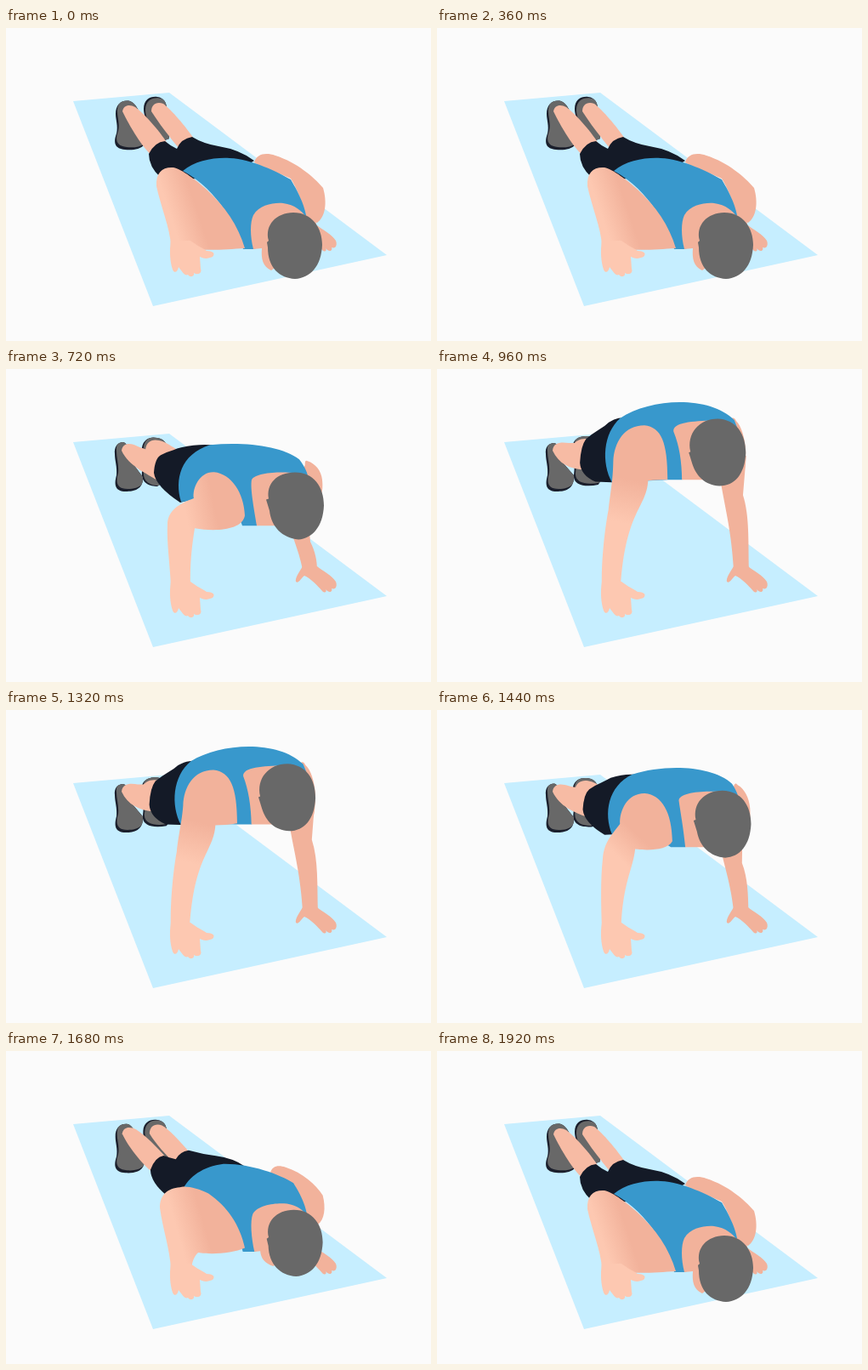
Write an HTML page with a canvas that moves like this. It is 500x368 px and loops after 2040 ms.

```html
<!DOCTYPE html>
<html lang="en">
<head>
<meta charset="utf-8">
<title>Push-up</title>
<style>
  html, body { margin: 0; width: 100%; height: 100%; overflow: hidden; background: #fbfbfb; }
  canvas { display: block; }
</style>
</head>
<body>
<canvas id="stage" width="500" height="368"></canvas>
<script>
const ctx = document.getElementById('stage').getContext('2d');
const LOOP = 2040, STEP = 120;
const MID = 0.6; // lift of the middle pose
const color = {
  back: '#fbfbfb', mat: '#c6eeff', shirt: '#3898cc', shorts: '#141a27',
  light: '#fdc8b1', skin: '#f2b29b', leg: '#f7bba4', grey: '#686868', sole: '#1b1f2c'
};

// Each moving part: its outline lowered, halfway and raised.
const parts = {
  farShoe: [
    'M162,95 C162,84 170,80 178,81 C186,82 189,88 189,95 L192,130 L187,132 C180,128 172,120 168,113 C165,108 162,102 162,95Z',
    'M160,92 C162,82 170,79 178,81 C185,82 188,86 189,90 L190,130 L178,138 C170,138 158,135 160,120 C162,110 159,100 160,92Z',
    'M160,88 C163,80 170,79 178,79 C184,80 188,84 189,90 L195,128 L190,136 C175,139 160,137 161,125 C163,110 161,100 160,88Z'],
  nearShoe: [
    'M129,101 C129,90 136,84 146,86 C153,89 156,96 158,104 L163,137 C158,143 148,144 140,143 C128,142 126,135 130,124 C132,115 129,108 129,101Z',
    'M128,100 C127,92 131,86 138,86 C143,87 144,95 146,107 L161,127 C162,142 150,144 141,144 C128,144 127,136 130,125 C131,115 128,108 128,100Z',
    'M128,100 C127,92 131,87 138,87 C143,88 145,97 147,109 L161,125 C162,142 150,144 141,144 C128,144 127,136 130,125 C131,115 128,108 128,100Z'],
  farLeg: [
    'M171,98 C171,90 177,86 185,89 C192,94 207,110 221,130 L204,142 C192,128 180,112 171,98Z',
    'M164,95 C165,86 171,82 180,84 C188,85 195,92 206,97 L190,115 C180,110 168,104 164,95Z',
    'M160,90 C162,85 168,82 174,82 C178,82 180,82 184,84 L178,100 C172,98 165,96 160,90Z'],
  nearLeg: [
    'M137,98 C138,91 145,89 152,93 C162,100 180,120 190,136 L172,150 C162,143 145,115 137,98Z',
    'M136,96 C137,87 146,86 155,91 C163,94 172,97 184,101 L180,132 C165,122 145,115 136,96Z',
    'M136,96 C137,86 146,86 155,87 C162,87 168,86 178,83 L174,118 C156,118 143,111 136,96Z'],
  shorts: [
    'M168,148 Q175,134 187,133 Q194,139 201,142 Q206,130 219,128 Q232,136 250,139 Q275,143 292,156 L260,175 L208,178 L182,176 Q168,163 168,148Z',
    'M174,122 Q175,105 182,101 Q190,97 197,95 Q201,93 206,92 Q225,88 240,89 Q250,89 255,90 L235,130 L212,155 L205,157 Q176,138 174,122Z',
    'M168,110 Q169,90 175,82 Q182,76 190,71 Q197,67 202,62 Q208,58 213,57 Q218,56 225,58 L215,100 L212,133 L186,132 Q169,125 168,110Z'],
  farShoulder: [
    'M292,158 C295,148 305,146 317,150 C342,158 362,175 373,188 C378,205 376,222 366,229 L352,222 C350,205 340,185 335,177 C320,170 300,163 292,158Z',
    'M352,112 C352,107 353,107 355,108 C364,111 371,119 372,130 C373,140 372,148 368,150 L352,150 C350,135 350,122 350,116 C351,115 352,113 352,112Z',
    'M345,58 C348,55 350,56 352,60 C358,66 362,80 363,95 C363,110 362,120 360,125 L335,125 C335,100 340,80 345,70 C345,65 345,60 345,58Z'],
  farArm: [
    'M338,210 C340,220 346,228 349,236 L366,236 C365,225 360,215 358,210 L350,205Z',
    'M330,170 C335,195 344,210 349,236 L366,236 C366,226 364,215 358,203 L356,180Z',
    'M331,110 C335,150 346,180 349,236 L367,236 C366,205 368,172 360,147 L364,100Z'],
  shirt: [
    'M208,168 C222,156 245,152 263,153 C290,154 320,170 335,178 C343,192 350,205 353,220 L320,240 L292,260 L279,260 C275,240 250,190 208,168Z',
    'M206,156 C198,130 205,100 240,89 C280,85 325,90 345,106 C352,115 355,122 356,130 L330,160 L295,184 L278,184 C275,170 250,150 206,156Z',
    'M206,133 C193,110 195,75 215,57 C250,33 320,29 350,59 C352,65 355,70 354,75 L330,110 L288,129 L271,129 C250,130 220,133 206,133Z'],
  neck: [
    'M291,260 C287,245 287,228 291,220 C298,208 315,205 326,206 C340,208 348,215 353,222 L345,260 L312,285 C302,280 300,272 301,259Z',
    'M295,184 C292,165 287,140 289,130 C293,121 325,120 340,122 C350,124 354,128 356,132 L345,165 L320,184 C310,184 300,184 295,184Z',
    'M288,129 C288,108 285,88 278,72 C277,61 300,60 325,59 C335,58 345,60 352,66 L345,110 L320,129 C310,129 300,129 288,129Z'],
  nearArm: [
    'M194,256 C193,235 182,210 177,186 C176,170 184,163 197,164 C207,166 225,180 235,189 C258,210 273,232 281,259 C262,260 240,262 228,260 C222,258 219,258 218,264Z',
    'M194,256 C193,230 189,205 190,183 C190,166 205,158 221,152 C219,140 228,120 245,121 C265,123 280,145 281,172 C278,190 245,191 222,187 C219,205 216,230 217,256Z',
    'M194,256 C193,230 197,190 202,165 C205,140 207,130 207,108 C208,85 220,65 244,65 C264,67 271,85 271,129 C262,129 255,129 249,130 C247,163 222,165 216,256Z'],
  head: [
    'M308,258 L307,252 L309,250 C304,232 318,217 338,217 C360,217 372,235 372,255 C371,280 358,294 340,295 C322,294 308,282 308,258Z',
    'M310,166 L306,153 L309,152 C306,135 318,121 340,121 C362,121 374,138 374,160 C373,185 360,199 344,200 C325,198 312,185 310,166Z',
    'M300,110 L296,97 L298,96 C293,75 308,57 330,57 C352,58 363,75 363,97 C362,122 350,136 332,136 C315,135 305,125 300,110Z'],
  // from light to dark skin along the near arm
  shade: ['195,225 225,215', '212,172 246,165', '222,182 232,130']
};

const mat = 'M79,86 L192,76 L448,267 L173,327Z';
const farHand = 'M349,232 C344,240 340,246 341,250 C344,253 347,246 351,243 C358,246 366,254 372,261 C375,264 378,262 376,259 C380,264 385,262 383,258 C388,260 390,255 388,250 C384,243 372,237 366,232Z';
const nearHand = 'M194,250 C192,262 193,275 196,284 C198,289 202,287 203,281 C207,286 210,292 214,290 C217,294 222,292 221,288 C226,291 231,288 229,283 L228,269 C234,272 238,271 243,269 C247,265 243,262 236,262 C230,258 225,256 217,250Z';

const NUM = /\d+/g;

function pose(name, lift) {
  const i = lift < MID ? 0 : 1;
  const u = i ? (lift - MID) / (1 - MID) : lift / MID;
  const end = parts[name][i + 1].match(NUM);
  let n = 0;
  return parts[name][i].replace(NUM, a => (+a + (end[n++] - a) * u).toFixed(2));
}

function fill(path, paint) {
  ctx.fillStyle = paint;
  ctx.fill(new Path2D(path));
}

function shoe(path, dx, dy) {
  fill(path, color.sole);
  ctx.save();
  ctx.clip(new Path2D(path));
  ctx.translate(dx, dy);
  fill(path, color.grey);
  ctx.restore();
}

function ease(t, from, to) {
  const u = Math.min(1, Math.max(0, (t - from) / (to - from)));
  return (1 - Math.cos(Math.PI * u)) / 2;
}

function draw(t) {
  const lift = ease(t, 360, 1000) - ease(t, 1242, 1856);
  const part = (name, paint) => fill(pose(name, lift), paint);

  ctx.fillStyle = color.back;
  ctx.fillRect(0, 0, 500, 368);
  fill(mat, color.mat);

  shoe(pose('farShoe', lift), 2, 1.5 - 4 * lift);
  part('farLeg', color.leg);
  shoe(pose('nearShoe', lift), 2, -3);
  part('nearLeg', color.leg);
  part('shorts', color.shorts);

  part('farArm', color.skin);
  fill(farHand, color.skin);
  part('farShoulder', color.skin);
  part('shirt', color.shirt);
  part('neck', color.skin);

  const shade = ctx.createLinearGradient(...pose('shade', lift).split(/[ ,]/).map(Number));
  shade.addColorStop(0, color.light);
  shade.addColorStop(1, color.skin);
  part('nearArm', shade);
  fill(nearHand, color.light);
  part('head', color.grey);
}

const start = performance.now();
function tick() {
  const t = (performance.now() - start) % LOOP;
  draw(Math.floor(t / STEP) * STEP);
  requestAnimationFrame(tick);
}
tick();
</script>
</body>
</html>
```
